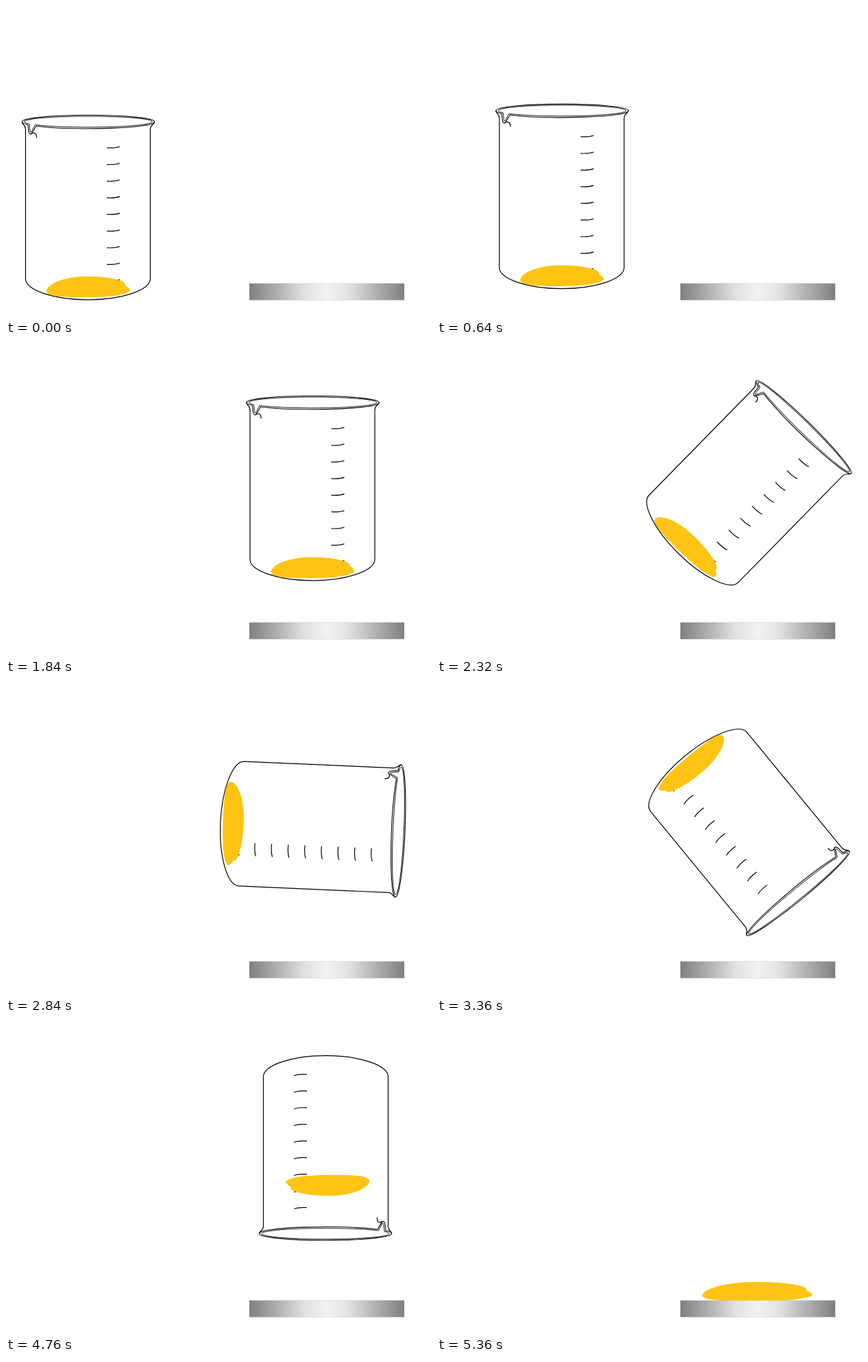
Recreate the animation shown at these times as an HTML page. Size 620 by 454 pixels, loop 5560 ms.

```html
<!DOCTYPE html>
<html lang="en">
<head>
<meta charset="utf-8">
<title>Pouring from a beaker</title>
<style>
  html, body { margin: 0; width: 100%; height: 100%; overflow: hidden; background: #fff; }
  svg { display: block; width: 620px; height: 454px; }
</style>
</head>
<body>
<svg viewBox="0 0 620 454">
  <defs>
    <linearGradient id="steel">
      <stop offset="0" stop-color="#7f7f7f"/>
      <stop offset=".2" stop-color="#b5b5b5"/>
      <stop offset=".36" stop-color="#e2e2e2"/>
      <stop offset=".5" stop-color="#f2f2f2"/>
      <stop offset=".64" stop-color="#e2e2e2"/>
      <stop offset=".8" stop-color="#b5b5b5"/>
      <stop offset="1" stop-color="#7f7f7f"/>
    </linearGradient>
  </defs>
  <g id="beaker" fill="none" stroke="#000" stroke-width="1.2" stroke-linejoin="round">
    <path d="M23.3 169C23.5 173 28.5 173 28.5 180V398C28.5 414.5 69 428.8 119.5 428.8S210.5 414.5 210.5 398V180C210.5 173 216.5 173 216.7 169"/>
    <path stroke-width="1.1" d="M44 175.2A96.7 9.7 0 0 0 216.7 169A96.7 9.7 0 0 0 23.3 169Q24 172 32 173.2L33 183Q34 187.5 36.5 187Q38 185.5 44 175.2"/>
    <path stroke-width=".9" d="M42.5 173.4A93.5 8 0 0 0 213.5 169A93.5 8 0 0 0 26.5 169Q28 171 34 172.2L35 182Q35.5 185 37 184Z"/>
    <path d="M36.5 187C40 184 45 185 44.5 192.5"/>
    <path id="ticks"/>
  </g>
  <path id="blob" fill="#ffc413" d="M59 415.2C61 409.2 68 404.2 80 400.2C95 395.7 105 394.7 120 394.7C140 394.7 158 397.5 168 401.2C173 403.2 175 405.2 174 408.2C178 410.2 181 413.2 181 415.2C180 418.2 170 421.2 158 423.2C140 425.2 100 426.2 80 424.2C66 423.2 58 420.2 59 415.2Z"/>
  <rect x="355" y="405" width="226" height="24.3" fill="url(#steel)" stroke="#bbb" stroke-width=".4"/>
</svg>
<script>
const STEP = 40, LOOP = 5560;
const beaker = document.getElementById('beaker');
const blob = document.getElementById('blob');

document.getElementById('ticks').setAttribute('d',
  Array.from({ length: 9 }, (_, i) => `M147 ${207 + i * 24.3}q12 .8 19-1.8`).join(''));

// Constant acceleration, cruise, constant deceleration; p and result in 0..1.
function glide(p, ramp = 0.355) {
  p = Math.min(1, Math.max(0, p));
  const speed = 1 / (1 - ramp);
  if (p < ramp) return speed * p * p / (2 * ramp);
  if (p > 1 - ramp) return 1 - speed * (1 - p) ** 2 / (2 * ramp);
  return speed * (p - ramp / 2);
}

// Places a part so that the beaker's middle (120, 294) lands on x, y.
const pose = (x, y, angle) => `translate(${x} ${y}) rotate(${angle}) translate(-120 -294)`;

function draw(ms) {
  const n = Math.floor(ms / STEP);
  beaker.style.display = n < 134 ? '' : 'none';
  if (n < 95) {
    const p = glide((n - 4) / 40.6);
    const angle = Math.min(180, Math.max(0, (n - 46) * 3.7));
    const place = pose(120 + 327.5 * p, 294 - 85 * p, angle);
    beaker.setAttribute('transform', place);
    blob.setAttribute('transform', place);
  } else if (n < 134) {
    const p = glide((n - 98) / 40.6);
    beaker.setAttribute('transform', pose(466, 182.5, 180));
    blob.setAttribute('transform', pose(466 + 6 * p, 182.8 + 323 * p, 180));
  } else {
    blob.setAttribute('transform', 'translate(387 378) scale(1.32 .92) translate(-59 -394.7)');
  }
}

const start = performance.now();
function tick() {
  draw((performance.now() - start) % LOOP);
  requestAnimationFrame(tick);
}
tick();
</script>
</body>
</html>
```
